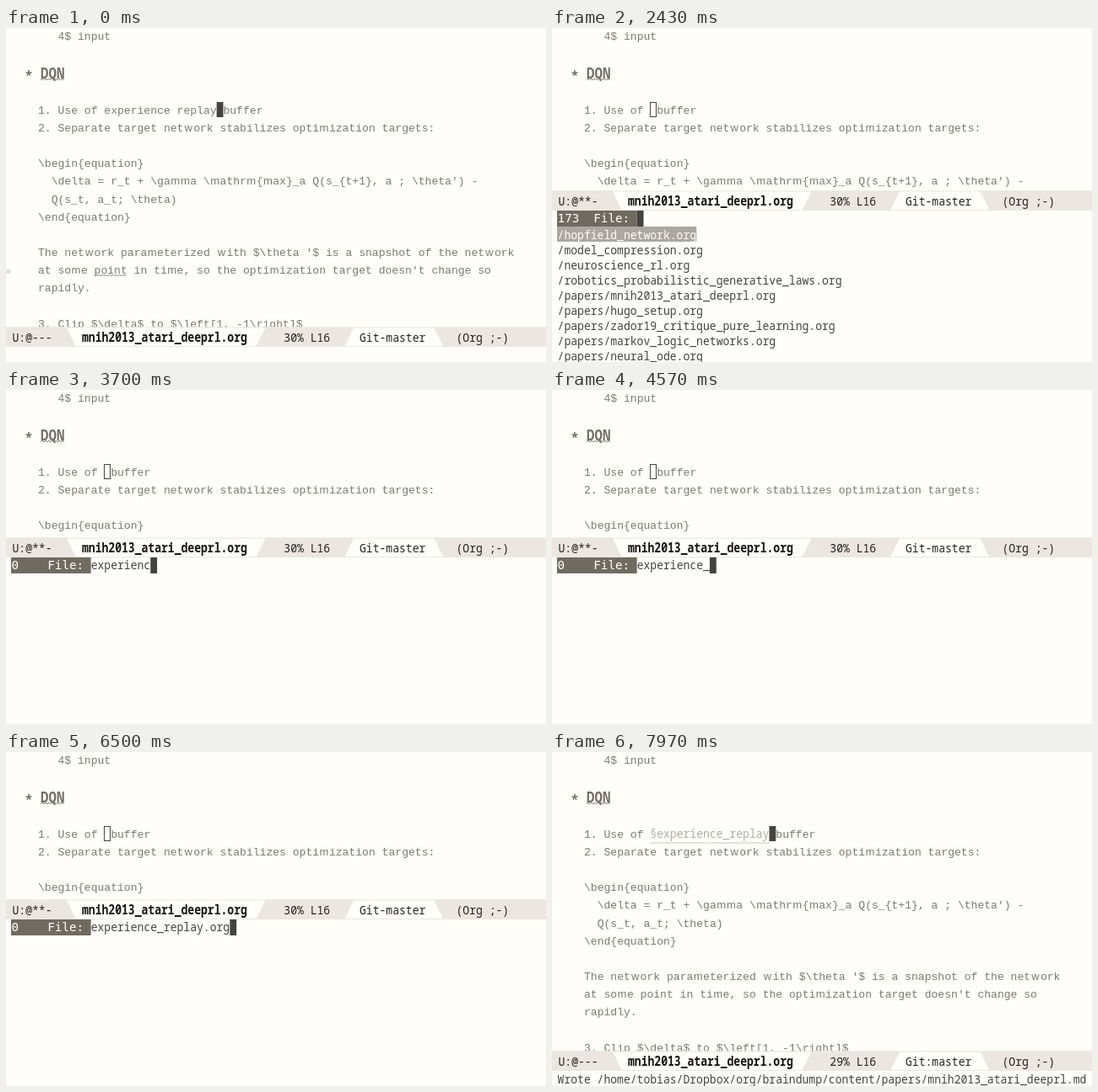
Animation, 640 px wide and 397 px high, one loop 8 s. Source, as an HTML page:

```html
<!DOCTYPE html>
<html lang="en">
<head>
<meta charset="utf-8">
<title>Org notes</title>
<style>
  html, body { margin: 0; width: 100%; height: 100%; overflow: hidden; background: #fffefa; }
  svg { display: block; }
  text { white-space: pre; }
  .body { font: 13.07px "Liberation Mono", monospace; fill: #7d7871; }
  .wide { font-family: "Liberation Sans", sans-serif; }
  .mono { font: 13.07px "Noto Sans Mono", monospace; fill: #45423e; }
  .bar { fill: #24221f; }
  .bold { font-weight: 700; fill: #151412; }
  .head { font-size: 15.68px; font-weight: 700; fill: #736e67; }
  .link { fill: #b1aca6; }
  .prompt { font: 14.2px "DejaVu Sans Mono", monospace; fill: #fffefa; }
  .picked, .picked .bold { fill: #fffefa; }
  .fringe { font: 12px "DejaVu Sans", sans-serif; fill: #c4bfb9; }
  .wave { fill: none; stroke: #8b867f; stroke-width: 1; }
</style>
</head>
<body>
<svg id="stage" width="640" height="397" viewBox="0 0 640 397"></svg>
<script>
const LOOP = 8000;
const CELL = 7.84, LEFT = 6.6, INDENT = LEFT + 4 * CELL;
const ROW = 18, PROMPT_ROW = 19, BODY_ROW = 21.16;
const PAPER = '#fffefa', BAR = '#ebe6e1', DARK = '#454340';
const FILES = ['/hopfield_network', '/model_compression', '/neuroscience_rl',
  '/robotics_probabilistic_generative_laws', '/papers/mnih2013_atari_deeprl',
  '/papers/hugo_setup', '/papers/zador19_critique_pure_learning',
  '/papers/markov_logic_networks', '/papers/neural_ode'];
const EX_FILES = ['/exponential_family', '/extended_kalman_filter', '/bias_complexity_tradeoff'];
const QUERY = 'experience_replay.org';
const KEY_TIMES = [2570, 2730, 2930, 3030, 3150, 3290, 3420, 3560, 3690, 3840, 4300,
  4700, 4830, 4980, 5100, 5220, 5360, 5560, 5740, 5830, 5960];

const stage = document.getElementById('stage');
const rect = (x, y, w, h, fill) => `<rect x="${x}" y="${y}" width="${w}" height="${h}" fill="${fill}"/>`;
const col = n => INDENT + n * CELL;

// Tall, narrow interface type
const tall = (s, x, y, cls = '') =>
  `<text class="mono ${cls}" transform="translate(${x} ${y}) scale(1 1.16)">${s}</text>`;

// Duospaced body type: m and w take one and a half cells
function duo(s, x, y, fill = '') {
  let out = '';
  for (const part of s.split(/([mw])/)) {
    const wide = part === 'm' || part === 'w';
    const pad = part === 'm' ? 0.4 : 1.15;
    out += wide ? `<tspan class="wide" x="${x + pad}">${part}</tspan>` : `<tspan x="${x}">${part}</tspan>`;
    x += CELL * (wide ? 1.5 : part.length);
  }
  return `<text class="body" y="${y}"${fill && ` style="fill:${fill}"`}>${out}</text>`;
}

function wave(x, y, width) {
  let d = `M${x} ${y}`;
  for (let i = 1; i <= width / 2; i++) d += `L${x + 2 * i} ${y + (i % 2 ? -2 : 0)}`;
  return `<path class="wave" d="${d}"/>`;
}

function firstItem(t) {
  const y = 102, top = 88;
  const block = c => rect(col(c), top, CELL, 18, DARK);
  if (t < 1770) {
    const point = t < 870 ? 27 : t < 1050 ? 21 : 10;
    const line = '1. Use of experience replay buffer';
    return (point < 27 ? rect(col(point), top, (27 - point) * CELL, 18, '#e1dcd5') : '') +
      block(point) + duo(line, INDENT, y) + duo(line[point], col(point), y, PAPER);
  }
  if (t < 6600) {
    const cursor = t < 2430 ? block(10) :
      `<rect x="${col(10) + .1}" y="88.5" width="7" height="17" fill="none" stroke="${DARK}"/>`;
    return cursor + duo('1. Use of', INDENT, y) + duo('buffer', col(11), y);
  }
  return duo('1. Use of', INDENT, y) + tall('§experience_replay', col(10), y, 'link') +
    rect(col(10), 107.5, 18 * CELL, 1, '#cbc6c0') + block(28) + duo('buffer', col(29), y);
}

function buffer(t) {
  const exported = t >= 7940;
  // Indent, line below the second item, text
  const lines = [
    [0, 0, '2. Separate target network stabilizes optimization targets:'],
    [0, 2, String.raw`\begin{equation}`],
    [2, 3, String.raw`\delta = r_t + \gamma \mathrm{max}_a Q(s_{t+1}, a ; \theta') -`],
    [2, 4, String.raw`Q(s_t, a_t; \theta)`],
    [0, 5, String.raw`\end{equation}`],
    [0, 7, String.raw`The network parameterized with $\theta '$ is a snapshot of the network`],
    [0, 8, "at some point in time, so the optimization target doesn't change so"],
    [0, 9, 'rapidly.'],
    [0, 11, String.raw`3. Clip $\delta$ to $\left[1, -1\right]$`],
  ];
  return duo('4$ input', col(3), 14) +
    lines.map(([c, n, s]) => duo(s, col(c), 123 + n * BODY_ROW)).join('') +
    `<text class="mono head" x="${LEFT + 2 * CELL}" y="61.5">*</text>` +
    tall('DQN', 41.1, 59.5, 'head') + wave(41, 62, 28) + firstItem(t) +
    (exported ? '' : wave(104.8, 295, 39) + '<text class="fringe" x="-1" y="293">»</text>');
}

function modeline(t, bottom) {
  const h = 23.5, y = bottom - h, base = y + 17.8;
  const saved = t < 1770 || t >= 7700;
  const slab = points => `<polygon fill="${BAR}" points="${points}"/>`;
  return rect(0, y, 640, 397 - y, PAPER) + rect(0, y, 640, 1, BAR) + rect(0, bottom - 1, 640, 1, BAR) +
    slab(`0,${y} 71.5,${y} 83,${bottom} 0,${bottom}`) +
    slab(`308,${y} 412.5,${y} 401,${bottom} 296,${bottom}`) +
    slab(`507,${y} 640,${y} 640,${bottom} 518.5,${bottom}`) +
    tall(saved ? 'U:@---' : 'U:@**-', 7.5, base, 'bar') +
    tall('mnih2013_atari_deeprl.org', 90, base, 'bar bold') +
    tall(`${t < 6670 ? 30 : 29}% L16`, 329.3, base, 'bar') +
    tall(t < 7900 ? 'Git-master' : 'Git:master', 419, base, 'bar') +
    tall('(Org ;-)', 533.5, base, 'bar');
}

function candidates(query) {
  if (query.length > 3) return [];
  if (query.length === 3) return EX_FILES.slice(0, 1);
  return query.length === 2 ? EX_FILES : FILES;
}

function fileMenu(t, top) {
  const query = QUERY.slice(0, KEY_TIMES.filter(k => k <= t).length);
  const count = [173, 158, 3, 1][query.length] ?? 0;
  const base = top + 14.3, inputX = LEFT + 12 * CELL;
  let out = rect(LEFT - .6, top, 12 * CELL + .6, PROMPT_ROW, '#6f6b60') +
    `<text class="prompt" x="${LEFT}" y="${base}">${String(count).padEnd(4)} File: </text>` +
    tall(query, inputX, base) + rect(inputX + query.length * CELL, top, CELL, PROMPT_ROW, DARK);
  candidates(query).forEach((file, i) => {
    const name = file + '.org', y = top + PROMPT_ROW + ROW * i;
    const label = query ? name.replace(query, '<tspan class="bold">$&</tspan>') : name;
    if (i === 0) out += rect(LEFT - .6, y, name.length * CELL + .6, ROW, '#aca7a0');
    out += tall(label, LEFT, y + 14.5, i ? '' : 'picked');
  });
  return out;
}

function message(t) {
  if (t >= 630 && t < 870) return 'Mark set';
  if (t >= 7860) return 'Wrote /home/tobias/Dropbox/org/braindump/content/papers/mnih2013_atari_deeprl.md';
  if (t >= 7530) return 'Wrote /home/tobias/.org/braindump/org/papers/mnih2013_atari_deeprl.org';
  return '';
}

function scene(t) {
  const choosing = t >= 2430 && t < 6600;
  const rows = !choosing ? 1 : t < 2470 ? 10 : 11;
  const top = 397 - ROW * rows;
  return rect(0, 0, 640, 397, PAPER) + buffer(t) + modeline(t, top) +
    (choosing ? fileMenu(t, top) : tall(message(t), LEFT, top + 14.5));
}

let shown = '';
const start = performance.now();
function draw() {
  const next = scene((performance.now() - start) % LOOP);
  if (next !== shown) stage.innerHTML = shown = next;
  requestAnimationFrame(draw);
}
draw();
</script>
</body>
</html>
```
